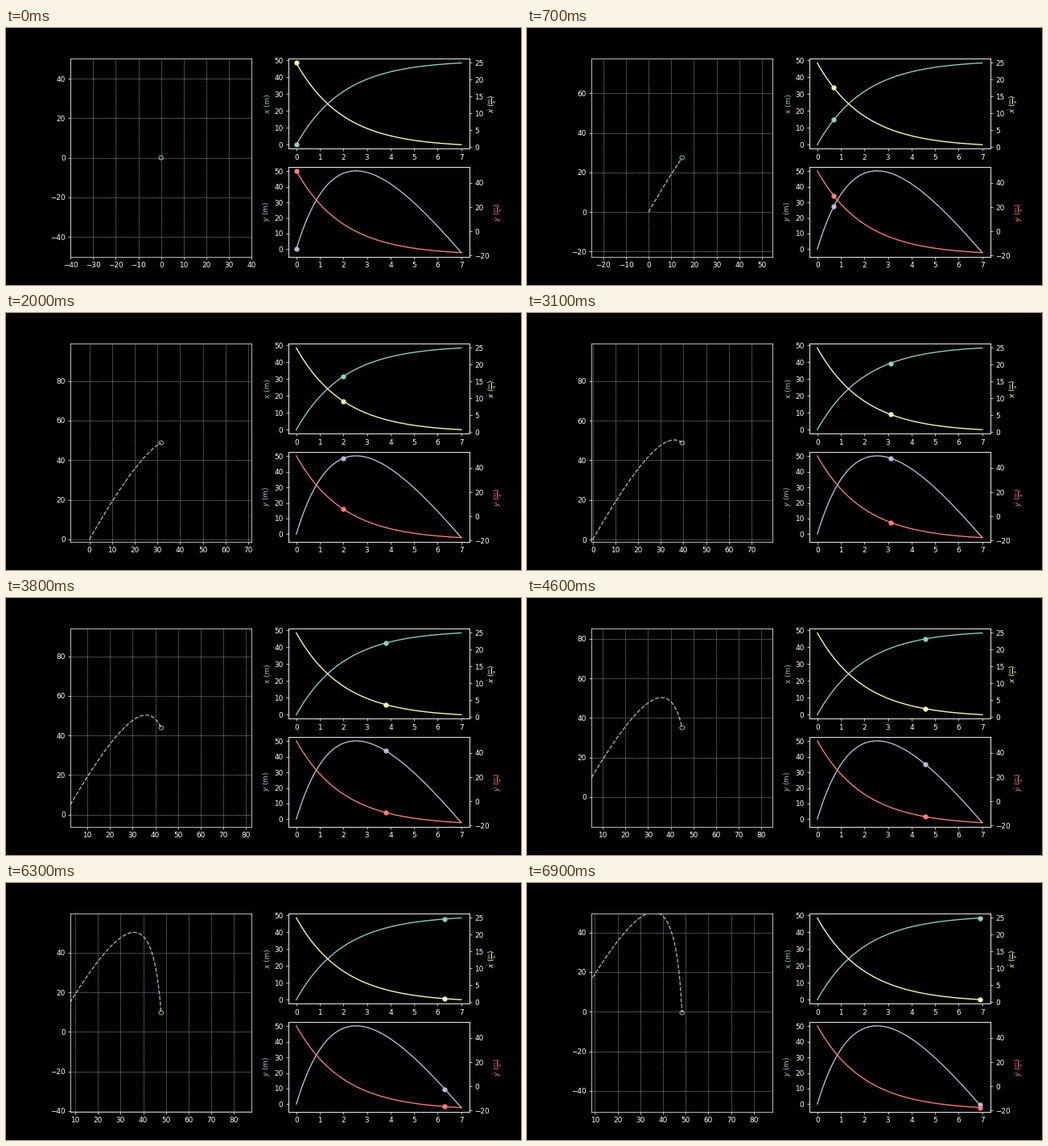
A matplotlib script for the animation above (7 s loop, 640 by 320 pixels).

```python
import numpy as np
import matplotlib.pyplot as plt
from matplotlib.animation import FuncAnimation
from matplotlib.patches import Circle

plt.style.use("dark_background")

FRAMES, STEP_MS = 70, 100
DRAG, GRAVITY = 0.5, 9.81
VX0, VY0 = 25, 50
FALL = GRAVITY / DRAG  # terminal speed
TEAL, YELLOW, LILAC, CORAL = "#8dd3c7", "#feffb3", "#bfbbd9", "#fa8174"


def pos_x(t):
    return VX0 / DRAG * (1 - np.exp(-DRAG * t))


def vel_x(t):
    return VX0 * np.exp(-DRAG * t)


def pos_y(t):
    return (VY0 + FALL) / DRAG * (1 - np.exp(-DRAG * t)) - FALL * t


def vel_y(t):
    return (VY0 + FALL) * np.exp(-DRAG * t) - FALL


times = np.linspace(0, 7, 701)
fig = plt.figure(figsize=(10, 5), dpi=64)
grid = fig.add_gridspec(2, 2)

# Camera view that follows the projectile
view = fig.add_subplot(grid[:, 0])
view.grid(linestyle=":")
trail, = view.plot([], [], "--", color=YELLOW, lw=1.5, alpha=0.7)
ball = view.add_patch(Circle((0, 0), 1, fill=False, color=TEAL))

dots = []


def add_curve(ax, func, color, label):
    ax.plot(times, func(times), color=color)
    ax.set_ylabel(label, color=color)
    dot, = ax.plot([0], [func(0)], "o", color=color)
    dots.append((dot, func))


top = fig.add_subplot(grid[0, 1])
add_curve(top, pos_x, TEAL, "x (m)")
add_curve(top.twinx(), vel_x, YELLOW, r"$\dot{x}$ $(\frac{m}{s})$")

bottom = fig.add_subplot(grid[1, 1])
add_curve(bottom, pos_y, LILAC, "$y$ (m)")
add_curve(bottom.twinx(), vel_y, CORAL, r"$\dot{y}$ $(\frac{m}{s})$")


def update(i):
    t = i * STEP_MS / 1000
    x, y = pos_x(t), pos_y(t)
    past = np.linspace(0, t, 10 * i + 1)
    trail.set_data(pos_x(past), pos_y(past))
    ball.center = x, y
    view.set_xlim(x - 40, x + 40)
    view.set_ylim(y - 50, y + 50)
    for dot, func in dots:
        dot.set_data([t], [func(t)])


anim = FuncAnimation(fig, update, frames=FRAMES, interval=STEP_MS,
                     init_func=lambda: None, repeat=True)
plt.show()
```
